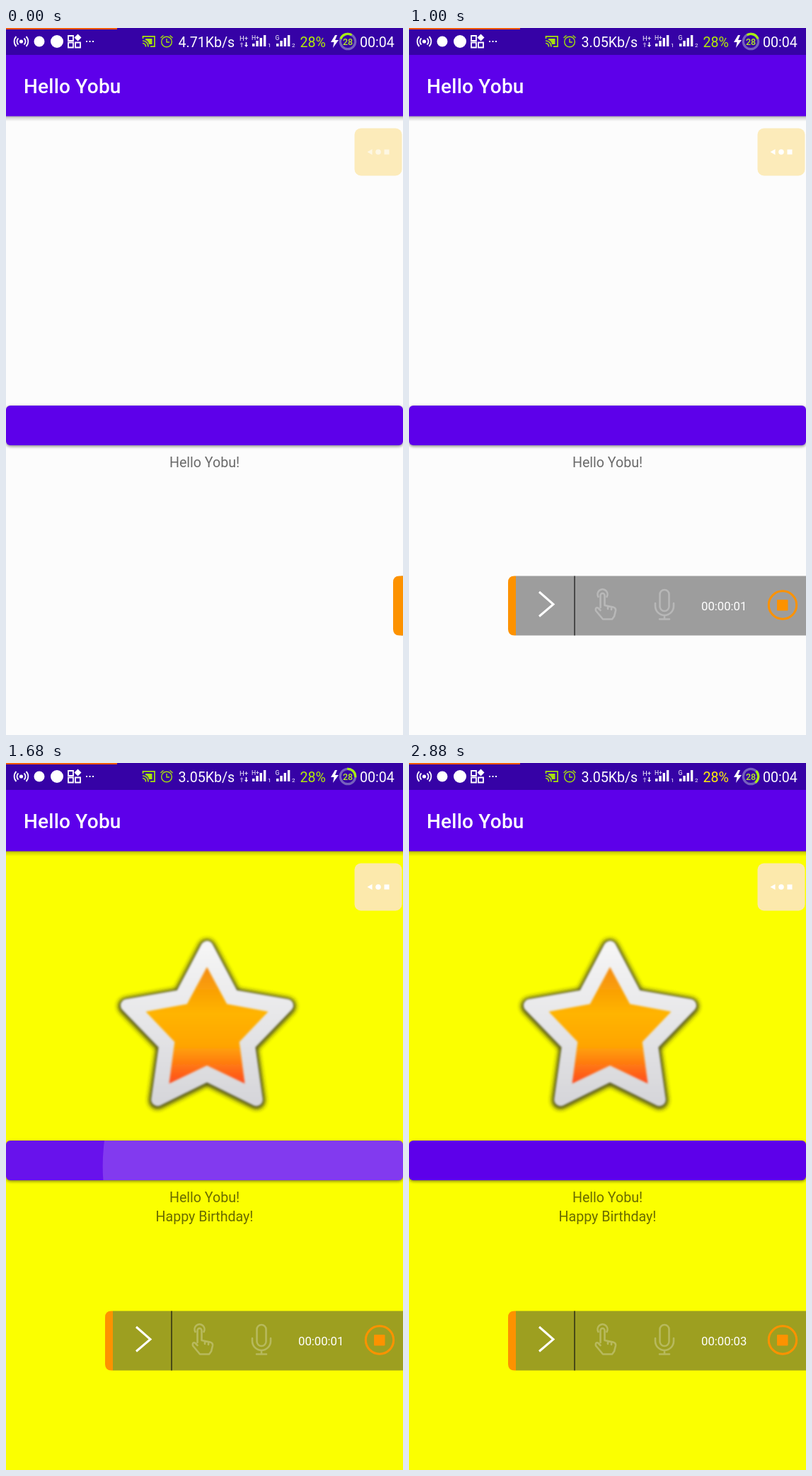
Animation, 561 px wide and 998 px high, one loop 2.92 s. Source, as an HTML page:

```html
<!DOCTYPE html>
<html lang="en">
<head>
<meta charset="utf-8">
<style>
  html, body { margin: 0; width: 100%; height: 100%; overflow: hidden; }
  svg { display: block; width: 100vw; height: 100vh; font-family: Roboto, sans-serif; }
</style>
</head>
<body>
<svg viewBox="0 0 561 998" preserveAspectRatio="none">
  <defs>
    <linearGradient id="barShade" x2="0" y2="1">
      <stop offset="0" stop-opacity=".34"/><stop offset=".4" stop-opacity=".13"/><stop offset="1" stop-opacity="0"/>
    </linearGradient>
    <linearGradient id="silver" x2="0" y2="1">
      <stop offset="0" stop-color="#f5f5f5"/><stop offset="1" stop-color="#d6d6da"/>
    </linearGradient>
    <linearGradient id="amber" x2="0" y2="1">
      <stop offset="0" stop-color="#f58c0c"/><stop offset=".4" stop-color="#ffb400"/>
      <stop offset=".68" stop-color="#ffa405"/><stop offset="1" stop-color="#ff4a1e"/>
    </linearGradient>
    <filter id="soft"><feGaussianBlur stdDeviation="1.5"/></filter>
    <filter id="rim" x="-20%" y="-20%" width="140%" height="140%"><feGaussianBlur stdDeviation="3"/></filter>
    <filter id="lift" x="-5%" y="-50%" width="110%" height="200%"><feGaussianBlur id="liftBlur" stdDeviation="2"/></filter>
    <clipPath id="buttonClip"><rect y="533" width="561" height="56" rx="6"/></clipPath>
  </defs>

  <rect id="page" width="561" height="998"/>

  <g id="star" stroke-linejoin="round">
    <path id="starRim" fill="#222" stroke="#222" stroke-width="25" opacity=".8" filter="url(#rim)"/>
    <path id="starEdge" fill="url(#silver)" stroke="url(#silver)" stroke-width="18" filter="url(#soft)"/>
    <path id="starFace" fill="url(#amber)" filter="url(#soft)"/>
  </g>

  <rect y="124" width="561" height="8" fill="url(#barShade)"/>
  <rect y="37" width="561" height="87.5" fill="#5d00ea"/>
  <text x="25" y="92" font-size="28" font-weight="500" letter-spacing=".2" fill="#fff">Hello Yobu</text>

  <rect width="561" height="38" fill="#3602a6"/>
  <rect width="157" height="2" fill="#ff5a00"/>
  <g fill="none" stroke="#fff" stroke-width="1.8">
    <path d="M17.500 14.500a6 6 0 0 0 0 9M25.500 14.500a6 6 0 0 1 0 9M14.500 12a10 10 0 0 0 0 14M28.500 12a10 10 0 0 1 0 14"/>
    <path d="M88 11h7v7h-7zM88 20.500h7v7h-7zM98 20.500h7v7h-7z"/>
  </g>
  <g fill="#fff">
    <circle cx="21.500" cy="19" r="2.600"/>
    <circle cx="47" cy="19" r="7.500"/>
    <circle cx="72" cy="19" r="9"/>
    <path d="M101.500 8.500l5 5-5 5-5-5z"/>
    <path d="M113 18h2v2h-2zM117.500 18h2v2h-2zM122 18h2v2h-2z"/>
    <path d="M465 10l-6 10h4.500l-1.500 8 8-11h-5l3-7z"/>
  </g>
  <g fill="none" stroke="#a5e20c" stroke-width="1.700">
    <path d="M193.500 15v-3.200h16.500v14.400h-6M193 18a8 8 0 0 1 8 8.500M193 21.500a4.500 4.500 0 0 1 4.500 5"/>
    <path d="M197 15h9.500v8h-4.500q-1-5-5-6z" fill="#a5e20c" stroke="none"/>
    <circle cx="227" cy="19.500" r="7.300" stroke-width="1.400"/>
    <path d="M227 15v5h4M218.500 14l4-3.500M235.500 14l-4-3.500" stroke-width="1.400"/>
  </g>
  <g font-size="19.600" fill="#fff">
    <text id="speed" x="243.500" y="26.500"></text>
    <text id="percent" x="415.500" y="26.500">28%</text>
    <text x="500" y="26.500">00:04</text>
  </g>
  <g fill="#fff" font-size="9.500">
    <text x="330" y="17.500">H+</text><text x="347" y="16.500" font-size="8.500">H+</text>
    <text x="380.500" y="16.500" font-size="8.500">G</text>
    <text x="370" y="27" font-size="8">1</text><text x="404" y="27" font-size="8">2</text>
    <path d="M333 20l2.500 3h-1.700v4h-1.600v-4h-1.700z" opacity=".5"/>
    <path d="M339.500 27l2.500-3h-1.700v-4h-1.600v4h-1.700z"/>
    <g id="bars"></g>
  </g>
  <g fill="none" stroke-width="3.200">
    <circle cx="483" cy="19" r="10.700" stroke="#7662bd"/>
    <circle id="charge" cx="483" cy="19" r="10.700" stroke="#a6ef10" pathLength="100" stroke-dasharray="28 72"/>
  </g>
  <text x="483" y="23.500" font-size="12.500" font-weight="500" text-anchor="middle" fill="#b4f020">28</text>

  <rect id="nav" x="492.500" y="141.500" width="67" height="67" rx="9"/>
  <g id="navMarks" fill="#fff">
    <path d="M510.500 175l7-4v8z"/><circle cx="526" cy="175" r="3.800"/><rect x="534.500" y="171.500" width="7" height="7"/>
  </g>

  <rect id="buttonShade" y="534" width="561" height="56" rx="6" filter="url(#lift)"/>
  <g clip-path="url(#buttonClip)">
    <rect y="533" width="561" height="56" fill="#5d00ea"/>
    <rect id="pressTint" y="533" width="561" height="56" fill="#fff"/>
    <circle id="ripple" cx="407.500" cy="569" fill="#fff"/>
  </g>
  <g font-size="19.600" text-anchor="middle" fill="#000" fill-opacity=".58">
    <text x="280.500" y="620">Hello Yobu!</text>
    <text id="wish" x="280.500" y="647">Happy Birthday!</text>
  </g>

  <g id="panel">
    <rect x="11" y="773.500" width="430" height="84" fill="#404040" fill-opacity=".5"/>
    <path id="tab" fill="#fd9200"/>
    <path d="M94 773.500v84" stroke="#111" stroke-width="1.200"/>
    <path d="M44 796l20 17.500-20 17" fill="none" stroke="#fff" stroke-width="3"/>
    <g fill="none" stroke="#fff" stroke-opacity=".27" stroke-width="2.600" stroke-linejoin="round" stroke-linecap="round">
      <path d="M130.500 818v-17a3 3 0 0 1 6 0v14l12 2.500q4 1 3.500 5l-2 8-3 4h-13l-10-12q-1-5 3-4l3.500 3.500M127.500 803a7 7 0 1 1 12 0M141 816v4M146 817v4"/>
      <rect x="214.500" y="793" width="13" height="30" rx="6.500"/>
      <path d="M208 812v4a13 13 0 0 0 26 0v-4M221 829v5.500M214 834.500h14"/>
    </g>
    <text id="timer" x="273" y="822" font-size="16.700" fill="#fff"></text>
    <circle cx="388" cy="814.500" r="19.700" fill="none" stroke="#fd9200" stroke-width="3"/>
    <rect x="380" y="807" width="15.500" height="15.500" rx="1" fill="#fd9200"/>
  </g>
</svg>

<script>
const LOOP = 2920, REVEAL = 1520;
const $ = id => document.getElementById(id);
const set = (id, attrs) => { for (const k in attrs) $(id).setAttribute(k, attrs[k]); };
const ramp = (t, from, to) => Math.min(1, Math.max(0, (t - from) / (to - from)));
const mix = (a, b, p) => a + (b - a) * p;
const easeOut = p => 1 - (1 - p) ** 3;

function starPath(outer, inner, cy) {
  const points = Array.from({ length: 10 }, (_, i) => {
    const radius = i % 2 ? inner : outer, angle = i * Math.PI / 5;
    return (284 + radius * Math.sin(angle)).toFixed(1) + ' ' + (cy - radius * Math.cos(angle)).toFixed(1);
  });
  return 'M' + points.join('L') + 'Z';
}
set('starRim', { d: starPath(119, 62, 380) });
set('starEdge', { d: starPath(119, 62, 379) });
set('starFace', { d: starPath(91, 48, 379) });

$('bars').innerHTML = [348, 382].map(x => [4, 8, 12, 16].map((h, i) =>
  `<rect x="${x + i * 5.3}" y="${26 - h}" width="3.4" height="${h}"/>`).join('')).join('');

function render(t) {
  const revealed = t >= REVEAL;
  set('page', { fill: revealed ? '#fbff00' : '#fcfcfc' });
  for (const id of ['star', 'wish']) set(id, { visibility: revealed ? 'visible' : 'hidden' });
  set('nav', { fill: revealed ? '#fce9ac' : '#fcebba' });
  set('navMarks', { opacity: t < 40 ? 0.6 : 1 });

  $('speed').textContent = t < 720 ? '4.71Kb/s' : '3.05Kb/s';
  const warm = ramp(t, 2040, 2840);
  set('percent', { fill: `rgb(${mix(178, 255, warm)},${mix(236, 238, warm)},10)` });
  set('charge', { transform: `rotate(${mix(-160, -45, t / LOOP)} 483 19)` });

  const open = easeOut(ramp(t, 640, 880)), tabWidth = mix(14, 11, open);
  set('panel', { transform: `translate(${mix(547, 140, open)} 0)` });
  set('tab', { d: `M${tabWidth} 773.500H9q-9 0-9 9v66q0 9 9 9H${tabWidth}z` });
  $('timer').textContent = '00:00:0' + Math.floor((t + 160) / 1000);

  const pressed = revealed ? 1 - ramp(t, 1720, 1920) : ramp(t, 1360, 1460);
  const raised = revealed ? 0 : pressed;
  set('pressTint', { opacity: 0.07 * pressed });
  set('ripple', {
    r: revealed ? mix(55.5, 430, ramp(t, REVEAL, 1800)) : 0,
    opacity: 0.17 * pressed
  });
  set('buttonShade', { y: mix(534.5, 541, raised), opacity: mix(0.5, 0.42, raised) });
  set('liftBlur', { stdDeviation: mix(2, 5, raised) });
}

const start = performance.now();
function frame() {
  render((performance.now() - start) % LOOP);
  requestAnimationFrame(frame);
}
frame();
</script>
</body>
</html>
```
